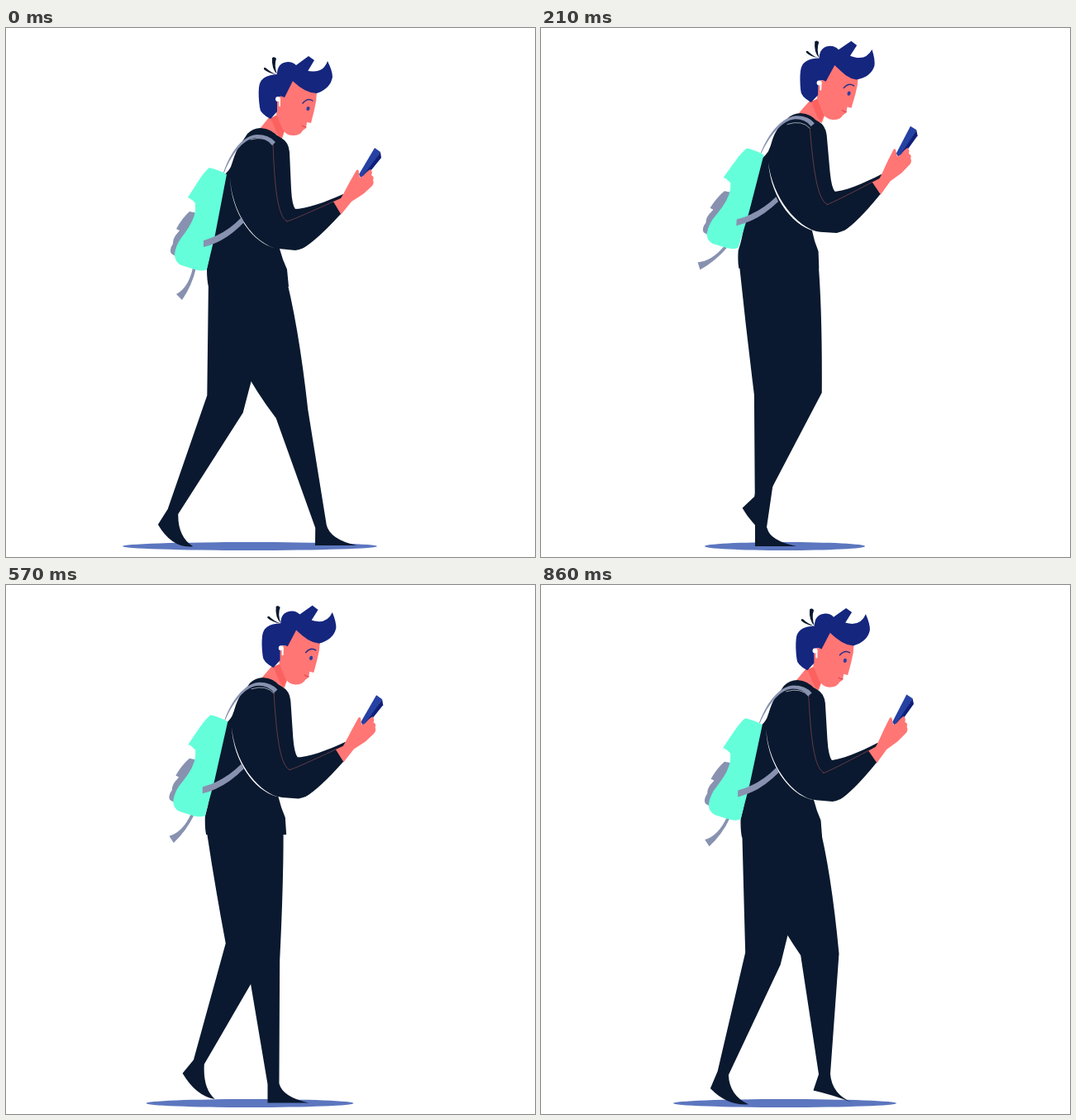
Animation, 640 px wide and 640 px high, one loop 0.93 s. Source, as an HTML page:

```html
<!DOCTYPE html>
<html lang="en">
<head>
<meta charset="utf-8">
<title>Walking with a phone</title>
<style>
  html, body { margin: 0; width: 100%; height: 100%; overflow: hidden; background: #fff; }
  svg { display: block; width: 100%; height: 100%; }
  .ink { fill: #0a192f; }
  .skin { fill: #ff7675; }
  .hair { fill: #15267f; }
  .grey { fill: #8892b0; }
  .line { fill: none; stroke-linecap: round; }
</style>
</head>
<body>
<svg viewBox="0 0 640 640">
  <ellipse id="shadow" cx="295" cy="627" rx="154" ry="5" fill="#5c76bf"/>
  <path id="legA" class="ink"/>
  <path id="legB" class="ink"/>

  <g id="head">
    <path class="skin" d="M320 106L306 123L316 134L334 134L338 122Z"/>
    <path fill="#fb625f" d="M320 109L328 105L337 123L333 132Q330 131 327 125Z"/>
    <path class="skin" d="M347 62L376 77Q376 88 373 99L369 115L364 114L363 121L359 124Q356 130 347 130Q338 130 334 121L327 104L328 88L336 80Z"/>
    <path class="hair" d="M320 110Q307 103 307 96Q305 82 306 72Q307 57 328 56Q328 42 341 41Q347 41 351 45L366 34L373 39L364 54L362 73Q354 71 347 64L337 84Q329 80 328 88V101Z"/>
    <path id="fringe" class="hair" d="M362 51Q383 57 389 40Q395 52 395 59Q393 73 376 79Q362 79 347 64Z"/>
    <path class="ink" d="M322 36Q325 34 327 37Q324 45 328 56Q321 49 322 36ZM312 48L314 48Q319 53 327 56Q318 55 312 50Z"/>
    <path class="skin" d="M328 84Q336 80 336 88Q335 94 329 95Z"/>
    <circle cx="329" cy="86" r="3" fill="#fff"/>
    <path class="line" d="M331 86V94" stroke="#fff" stroke-width="2"/>
    <ellipse cx="365.5" cy="97.5" rx="2" ry="2.6" fill="#2b3fa0" transform="rotate(15 365.5 97.5)"/>
    <path class="line" d="M359 91Q365 84 371 88" stroke="#2a2f85" stroke-width="1.5"/>
    <path class="line" d="M358 118Q360 120 363 120" stroke="#d9414e" stroke-width="1"/>
  </g>

  <path id="torso" class="ink" d="M292 128Q299 121 308 121Q322 122 329 132L334 150L331 267L335 280L340 292L342 313H245Q243 305 243 291Q248 272 249 250L265 177Q272 170 273 165Q280 145 292 128Z"/>

  <g id="pack">
    <path id="tail" class="grey" d="M226 290H230Q225 312 213 329L206 322Q221 314 226 290Z"/>
    <path class="grey" d="M222 222L232 224L216 250L205 276L200 273Q197 268 202 261C202 253 206 250 210 245L206 243Q213 230 222 222Z"/>
    <path fill="#64ffda" d="M246 169Q256 171 267 177L253 250L243 292Q238 295 228 292L212 287Q204 283 204 274Q205 262 215 250Q228 233 229 220V212Q225 207 220 205C228 193 238 175 246 169Z"/>
  </g>

  <g id="arm">
    <path class="ink" d="M300 130Q320 124 333 133Q342 138 343 150L345 195Q346 214 350 219L370 225L376 252Q362 268 350 269L330 267C300 262 272 225 271 185C272 155 285 130 300 130Z"/>
    <path id="gap" fill="#fff"/>
    <path class="line" d="M296 135Q314 130 323 141" stroke="#d4d8e2" stroke-width=".7"/>
    <path class="line" d="M323 141C325 190 328 228 340 234" stroke="#b9595f" stroke-width=".5"/>
    <g id="fore">
      <path fill="#2541a3" d="M427 177L446 145L453 150L434 178L429 181Z"/>
      <path fill="#101f78" d="M453 150L454 157L441 173L432 179Z"/>
      <path class="skin" d="M394 209L408 201L416 186L424 172Q427 170 427 176L428 181L432 179Q438 172 441 171Q444 174 442 178Q446 180 444 184Q446 188 442 192L432 201L418 210L405 226Z"/>
      <path class="ink" d="M345 219C362 220 385 211 408 201L405 206L396 210L405 225Q375 258 358 267L340 250Z"/>
      <path class="line" d="M340 234Q350 231 396 210" stroke="#b9595f" stroke-width=".5"/>
    </g>
  </g>

  <g id="straps" class="grey">
    <path d="M263 175C273 145 290 129 304 129Q318 129 326 138L322 142Q315 133 303 133C290 133 275 148 264 175Z"/>
    <path d="M239 257Q265 250 285 229L288 235Q265 259 239 265Z"/>
  </g>
</svg>
<script>
const $ = id => document.getElementById(id);
const LOOP = 930, STRIDE = 13, HALF = STRIDE / 2;

// Key poses of one leg through a stride
const POSES = [
  { at: 0, knee: [346, 467], ankle: [381, 603], pitch: 0, bend: 0 },       // contact
  { at: 3, knee: [277, 445], ankle: [266, 604], pitch: 0, bend: 0 },       // standing
  { at: 6.5, knee: [265, 455], ankle: [202, 585], pitch: 32, bend: 16 },   // push off
  { at: 9.75, knee: [318, 430], ankle: [270, 568], pitch: 46, bend: 8 },   // passing
  { at: 11.5, knee: [333, 437], ankle: [324, 586], pitch: 26, bend: -3 }   // reaching
];
POSES.push({ ...POSES[0], at: STRIDE });

const mix = (a, b, u) => a + (b - a) * u;
const mixPoint = (a, b, u) => a.map((v, i) => mix(v, b[i], u));

function pose(phase) {
  const i = POSES.findIndex(p => p.at > phase), a = POSES[i - 1], b = POSES[i];
  const u = (phase - a.at) / (b.at - a.at);
  return {
    knee: mixPoint(a.knee, b.knee, u),
    ankle: mixPoint(a.ankle, b.ankle, u),
    pitch: mix(a.pitch, b.pitch, u),
    bend: mix(a.bend, b.bend, u)
  };
}

const turn = ([x, y], a) => [x * Math.cos(a) - y * Math.sin(a), x * Math.sin(a) + y * Math.cos(a)];
const add = (p, q) => [p[0] + q[0], p[1] + q[1]];
const tilt = (a, b) => Math.atan2(a[0] - b[0], b[1] - a[1]);

function leg(phase, lift) {
  const { knee, ankle, pitch, bend } = pose(phase);
  const back = [245 - 5 * lift, 305 - 18 * lift];
  const front = [336 - lift, 291 - 14 * lift];
  const shin = tilt(knee, ankle);
  const flex = Math.abs(shin - tilt([290, front[1]], knee));
  const kneeHalf = 19 + 17 * flex;

  const kneeBack = add(knee, turn([-kneeHalf, 0], shin));
  const kneeFront = add(knee, turn([kneeHalf, 0], shin));
  const ankleBack = add(ankle, turn([-7, 0], shin));
  const ankleFront = add(ankle, turn([7, 0], shin));
  const foot = pitch * Math.PI / 180;
  const heel = add(ankle, turn([-7, 23], foot));
  const toe = add(ankle, turn([43, 23], foot));

  const sag = Math.max(0, kneeBack[0] - back[0]) ** 2 / 430;
  const ham = add(mixPoint(back, kneeBack, .5), [-sag, sag * .65]);
  const sole = add(mixPoint(heel, toe, .5), [-bend / 4, bend]);
  const instep = [mix(ankleFront[0], toe[0], .25) - 5, mix(ankleFront[1], toe[1], .7)];
  const quad = add(mixPoint(front, kneeFront, .5), [3, -20]);

  return `M${back}Q${ham} ${kneeBack}L${ankleBack}L${heel}Q${sole} ${toe}` +
    `Q${instep} ${ankleFront}L${kneeFront}Q${quad} ${front}Z`;
}

const move = (id, value) => $(id).setAttribute('transform', value);

function draw(k) {
  const m = k % HALF;
  const lift = Math.min(m, HALF - m) / 3;
  const wave = Math.sin(Math.PI * m / HALF);
  const trail = m < HALF / 2 ? wave * wave : wave;   // slow rise, late fall
  const lean = dy => `matrix(1 0 ${-.0606 * lift} ${1 - .022 * lift} ${13.3 * lift} ${(dy - 15.3) * lift})`;

  $('shadow').setAttribute('rx', 154 - 57 * lift);
  $('legA').setAttribute('d', leg(k, lift));
  $('legB').setAttribute('d', leg((k + HALF) % STRIDE, lift));

  move('head', `translate(${6 * lift} ${-19 * lift}) rotate(${2 * lift} 347 130)`);
  move('fringe', `rotate(${7 * lift} 362 62)`);
  move('torso', lean(0));
  move('pack', lean(-4.5));
  move('straps', lean(-4.5));
  move('tail', `rotate(${25 * trail} 228 291)`);
  move('arm', `translate(${7 * lift} ${-21 * lift}) rotate(${-2.5 * lift} 350 250)`);
  move('fore', `rotate(${-lift - 16.5 * (trail - lift)} 350 245)`);

  const w = .8 + 1.3 * lift;
  $('gap').setAttribute('d', `M271 180C272 225 300 262 328 267C${300 + w} ${262 - w} ${272 + w} ${225 - w} 271 180Z`);
}

// Steps are evenly spaced, on whole 10 ms ticks
const startOf = k => Math.floor((k * LOOP / STRIDE + 4) / 10) * 10;

let shown = -1;
function tick() {
  const t = performance.now() % LOOP;
  let k = STRIDE - 1;
  while (startOf(k) > t) k--;
  if (k !== shown) draw(shown = k);
  requestAnimationFrame(tick);
}
tick();
</script>
</body>
</html>
```
